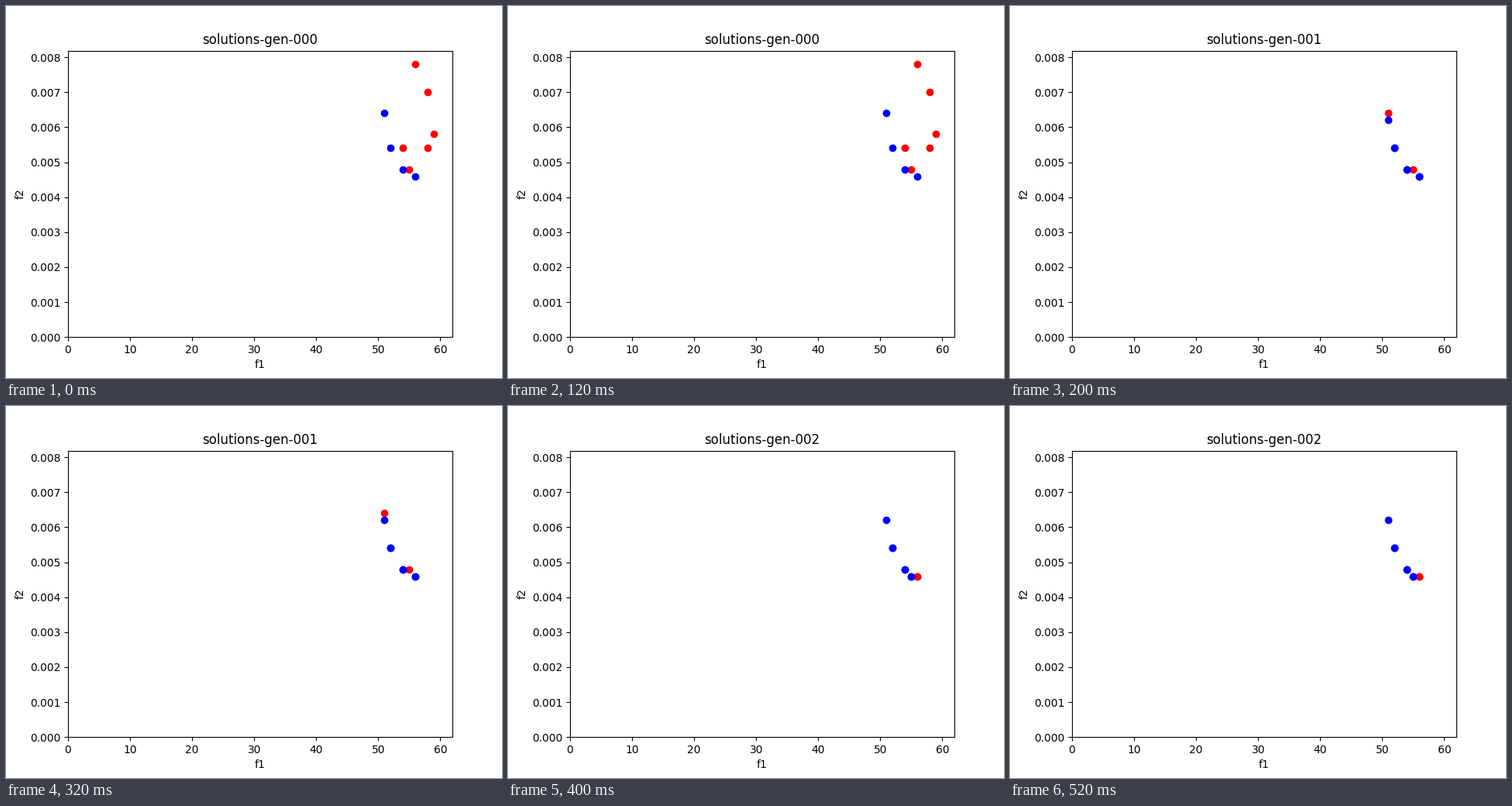
A matplotlib script that plays this animation: 640x480 px, repeating every 0.6 s.

```python
import matplotlib.pyplot as plt
from matplotlib.animation import FuncAnimation

F2_UNIT = 1e-4
PAD = 1.0499  # axis headroom over the largest value

# Points are (f1, f2 / F2_UNIT), both minimised
START = [(56, 78), (58, 70), (59, 58), (58, 54), (54, 54),
         (55, 48), (51, 64), (52, 54), (54, 48), (56, 46)]
CHILDREN = [[(51, 62), (55, 48)], [(55, 46), (55, 46)]]


def dominated(p, pop):
    return any(q != p and q[0] <= p[0] and q[1] <= p[1] for q in pop)


def elite(pop):
    return sorted({p for p in pop if not dominated(p, pop)})


def evolve(pop, children):
    """Keep the front, clone all but its first point, add the children."""
    best = elite(pop)
    return best + best[1:] + children


generations = [START]
for kids in CHILDREN:
    generations.append(evolve(generations[-1], kids))

plt.rcParams["font.family"] = "DejaVu Sans"
fig, ax = plt.subplots(figsize=(6.4, 4.8), dpi=100)
ax.set_xlim(0, PAD * max(x for x, _ in START))
ax.set_ylim(0, PAD * F2_UNIT * max(y for _, y in START))
ax.set_xlabel("f1")
ax.set_ylabel("f2")
title = ax.set_title("")
rest_dots, = ax.plot([], [], "o", color="red")
front_dots, = ax.plot([], [], "o", color="blue")


def place(dots, points):
    dots.set_data([x for x, _ in points], [y * F2_UNIT for _, y in points])


def update(gen):
    pop = generations[gen]
    title.set_text(f"solutions-gen-{gen:03d}")
    place(rest_dots, [p for p in pop if dominated(p, pop)])
    place(front_dots, [p for p in pop if not dominated(p, pop)])
    return title, rest_dots, front_dots


anim = FuncAnimation(fig, update, frames=len(generations), interval=200,
                     repeat=True, repeat_delay=0, blit=False)
plt.show()
```
